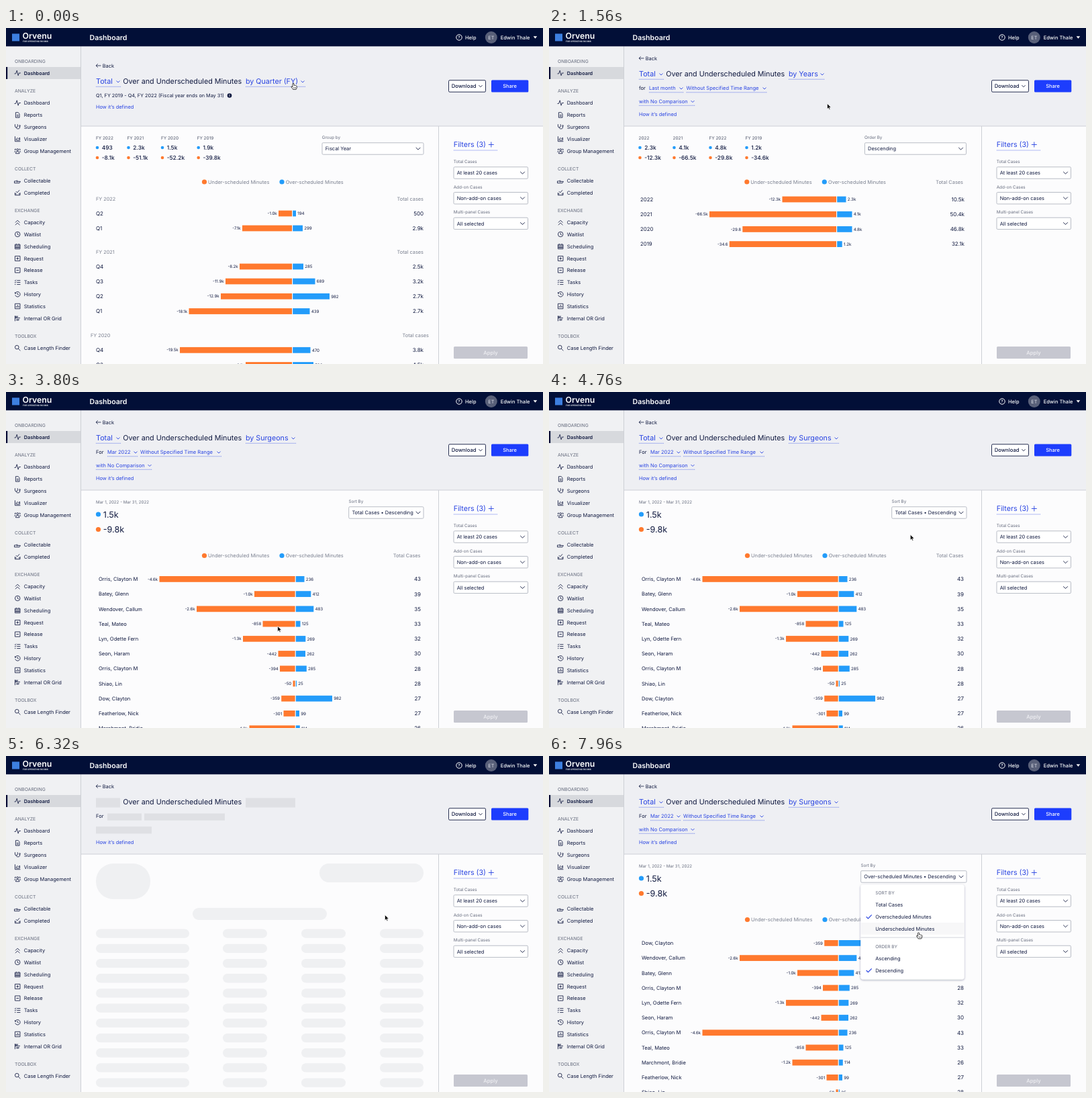
An HTML page that plays this animation: 800 by 500 pixels, repeating every 8 s.

```html
<!DOCTYPE html>
<html lang="en">
<head>
<meta charset="utf-8">
<title>Dashboard</title>
<style>
  html, body { margin: 0; width: 100%; height: 100%; overflow: hidden; background: #fcfcfd; }
  svg { display: block; width: 100%; height: 100%; }
  text { font-family: Inter, "Open Sans", sans-serif; text-rendering: geometricPrecision; white-space: pre; }
</style>
</head>
<body>
<svg viewBox="0 0 800 500">
  <defs>
    <filter id="shadow" x="-20%" y="-20%" width="140%" height="140%">
      <feDropShadow dx="0" dy="1" stdDeviation="1.8" flood-color="#101a3f" flood-opacity=".36"/>
    </filter>
  </defs>
  <g id="frame"></g>
  <g id="page"></g>
  <g id="cursor"></g>
</svg>
<script>
const INK = '#111a40', NAVY = '#020f37', LINK = '#2944e2', GREY = '#7b8090', LABEL = '#666c7e',
      ORANGE = '#ff792e', BLUE = '#239cfa', LINE = '#cdd0d6';
const $ = id => document.getElementById(id);

// Drawing helpers; text is centred vertically on y.
const text = (x, y, s, size = 7.5, fill = INK, weight = 400, anchor = 'start') =>
  `<text x="${x}" y="${y + size * 0.36}" font-size="${size}" fill="${fill}" font-weight="${weight}" text-anchor="${anchor}">${s}</text>`;
const rect = (x, y, w, h, fill, r = 0, extra = '') =>
  `<rect x="${x}" y="${y}" width="${w}" height="${h}" rx="${r}" fill="${fill}" ${extra}/>`;
const dot = (x, y, r, fill) => `<circle cx="${x}" cy="${y}" r="${r}" fill="${fill}"/>`;
const path = (d, stroke = INK, width = 0.8, extra = '') =>
  `<path d="${d}" fill="none" stroke="${stroke}" stroke-width="${width}" ${extra}/>`;
const chevron = (x, y, size = 3, stroke = INK) =>
  path(`M${x - size} ${y - size / 2}l${size} ${size}l${size} ${-size}`, stroke, 0.9);
const check = (x, y) => path(`M${x - 4} ${y}l2.7 2.7l5.3 -5.4`, LINK, 1.2);
const underline = (x, end, y) => path(`M${x} ${y}H${end}`, LINK, 0.8, 'stroke-dasharray="1.2 .8" opacity=".75"');
const link = (x, y, s, end, size = 7.55) =>
  text(x, y, s, size, LINK) + chevron(end - 4, y + 0.3, 2.5, LINK) + underline(x, end, y + (size > 9 ? 7.8 : 6.3));
const select = (x, y, end, s) =>
  rect(x, y - 8.7, end - x, 17.4, '#fff', 1.5, 'stroke="#a8acb8" stroke-width=".8"') +
  text(x + 4.7, y, s, 7.45) + chevron(end - 8, y, 3.3);

// Sidebar: [centre y, label, icon path on a 10 x 10 grid]; entries without an icon are headings.
const sidebar = [
  [49.5, 'ONBOARDING'],
  [67, 'Dashboard', 'M0 6H2.2L4 1L6 9L7.4 5H10'],
  [94, 'ANALYZE'],
  [111.5, 'Dashboard', 'M0 6H2.2L4 1L6 9L7.4 5H10'],
  [129.5, 'Reports', 'M2 1H6L8 3V9H2ZM3.5 5H6.5M3.5 7H6.5'],
  [147, 'Surgeons', 'M1 1V4A2 2 0 0 0 5 4V1M3 6V7A3 2 0 0 0 8.5 7V4.5M7.5 3.5A1 1 0 1 0 9.5 3.5A1 1 0 1 0 7.5 3.5'],
  [165, 'Visualizer', 'M1 1V9H9.5M3 7V5L5 3.5L6.5 5L8.5 3V7Z'],
  [183, 'Group Management', 'M3.5 3A1.5 1.5 0 1 0 6.5 3A1.5 1.5 0 1 0 3.5 3M2 9Q2 5.5 5 5.5T8 9ZM2.5 2H1V4M7.5 2H9V4M0 7L1.5 5M10 7L8.5 5'],
  [210, 'COLLECT'],
  [227, 'Collectable', 'M0 6H2L4 5L6 6.5H9.5L8 9H0ZM3 6.8H6'],
  [245, 'Completed', 'M1 5V9H9V5M1 7H3.5M6.5 7H9M2.5 3L4.5 5L8 1'],
  [272, 'EXCHANGE'],
  [289.5, 'Capacity', 'M1.5 5L5 1.5L8.5 5M1.5 9L5 5.5L8.5 9'],
  [307, 'Waitlist', 'M1 5A4 4 0 1 0 9 5A4 4 0 1 0 1 5M5 2.5V5.2L7 6.2'],
  [325, 'Scheduling', 'M1 2H9V9H1ZM1 4H9M3 .7V2M7 .7V2M3 5.5V8M5 5.5V8M7 5.5V8M1 6.5H9'],
  [343, 'Request', 'M1 1.2H9V8.8H1ZM3 5H7M5 3V7'],
  [360.5, 'Release', 'M1 1.2H9V8.8H1ZM3 5H7'],
  [378.5, 'Tasks', 'M.5 2L1.3 2.8L2.6 1M.5 5L1.3 5.8L2.6 4M.5 8.3H2M4 2H9.5M4 5H9.5M4 8.3H9.5'],
  [396, 'History', 'M1 2V4H3M1.3 4A4 4 0 1 1 1.3 6.5M5 3V5.3L6.8 6.2'],
  [414, 'Statistics', 'M1 1H9V9H1ZM3 7V5M5 7V3M7 7V4.5'],
  [432, 'Internal OR Grid', 'M1 1V9.5M1 2H6M1 4.5H9M3 7H8M1 3H5M3 8H7'],
  [459, 'TOOLBOX'],
  [476, 'Case Length Finder', 'M1 4A3 3 0 1 0 7 4A3 3 0 1 0 1 4M6.2 6.2L9.5 9.5']
];

function drawFrame() {
  let s = rect(0, 0, 800, 500, '#fcfcfd') + rect(111, 27, 689, 119, '#eeeff3') + rect(0, 27, 111.5, 473, '#f0f1f3') +
    rect(0, 58, 111, 18, '#d7d9dd') + rect(0, 58, 2.2, 18, NAVY) +
    path('M111.5 27V500M112 146H800M644.5 146V500', LINE, 1) + rect(0, 0, 800, 27.3, NAVY);
  for (const [y, label, icon] of sidebar) {
    if (!icon) { s += text(13, y, label, 6.8, LABEL); continue; }
    s += `<g transform="translate(12.5 ${y - 4.7}) scale(.94)">${path(icon, INK, 0.9)}</g>` +
      text(26.7, y, label, y === 67 ? 7.3 : 7.5, INK, y === 67 ? 600 : 400);
  }
  s += rect(9, 8.5, 11, 11, '#3d7fe0') + text(24.5, 11.5, 'Orvenu', 12.3, '#fff', 600) +
    text(25, 20, 'FOR OPERATING ROOMS', 3.15, '#fff', 600) + text(124.5, 14, 'Dashboard', 10.6, '#fff', 600) +
    `<circle cx="675" cy="14" r="4.2" fill="none" stroke="#fff"/>` + text(675, 14, '?', 6, '#fff', 600, 'middle') +
    text(684, 14, 'Help', 7.5, '#fff', 500) + dot(722.8, 14, 9, '#596079') +
    text(722.8, 14, 'ET', 7.2, '#dfe2ea', 400, 'middle') + text(736.7, 14, 'Edwin Thale', 7.5, '#fff', 500) +
    '<path d="M785.6 12.2h5.6l-2.8 3.6z" fill="#fff"/>';
  s += rect(659.5, 77.8, 55, 17.4, '#fff', 1.5, `stroke="${INK}" stroke-width=".9"`) +
    text(663.7, 86.5, 'Download', 7.7, INK, 500) + chevron(707, 86.5, 2.6) +
    rect(723, 77.5, 55.3, 18, '#1d3dfd', 1.5) + text(750.6, 86.5, 'Share', 7.5, '#fff', 500, 'middle');
  s += text(666.7, 173.5, 'Filters (3)', 10.7, LINK) + path('M718.8 173.5h8M722.8 169.5v8', LINK, 0.9) + underline(667, 732, 182);
  [['Total Cases', 'At least 20 cases'], ['Add-on Cases', 'Non-add-on cases'], ['Multi-panel Cases', 'All selected']]
    .forEach(([label, value], i) => {
      s += text(666.7, 198.5 + i * 37.8, label, 6.35, LABEL) + select(667, 215.5 + i * 37.7, 777.5, value);
    });
  return s + rect(667, 474, 110, 18, '#c6c7d0', 1.5) + text(722, 483, 'Apply', 7.7, '#f0f0f4', 500, 'middle');
}

const legend = (y, dx = 0) =>
  dot(295.5 + dx, y, 3.6, ORANGE) + text(301 + dx, y, 'Under-scheduled Minutes', 7.45, GREY) +
  dot(411 + dx, y, 3.6, BLUE) + text(416.7 + dx, y, 'Over-scheduled Minutes', 7.4, GREY);

// row: [name, under label, under start x, over end x, over label, total]
const barRow = (y, nameX, axis, totalX, [name, under, start, end, over, total], size = 7.6) =>
  text(nameX, y, name, size) + text(start - 2.3, y, under, 6.1, INK, 400, 'end') +
  rect(start, y - 4.4, axis - start, 8.8, ORANGE) + rect(axis + 1.2, y - 4.4, end - axis - 1.2, 8.8, BLUE) +
  text(end + 2.2, y, over, 6.2) + text(totalX, y, total, 8, INK, 400, 'end');

const summary = columns => columns.map(([x, title, over, under]) =>
  text(x, 163.5, title, 6.4, LABEL, 500) +
  dot(x + 2, 178, 2.3, BLUE) + text(x + 8.7, 178, over, 8.4, INK, 500) +
  dot(x + 2, 193, 2.3, ORANGE) + text(x + 8.7, 193, under, 8.4, INK, 500)).join('');

const heading = (y, by, end) =>
  text(143.7, y - 23.5, 'Back', 7.4) + path(`M141.5 ${y - 23.5}h-7.5m2.8 -2.6l-2.8 2.6l2.8 2.6`) +
  text(174.3, y, 'Over and Underscheduled Minutes', 10.75) +
  (by ? link(134, y, 'Total', 171, 10.8) + link(357, y, by, end, 10.7) : '');
const defined = y => text(134, y, 'How it’s defined', 7.45, LINK);

const quarters = [
  [276, 'Q2', '-1.0k', 406, 432, '194', '500'], [298, 'Q1', '-7.1k', 352, 442, '299', '2.9k'],
  [355, 'Q4', '-8.2k', 348, 443, '285', '2.5k'], [377, 'Q3', '-11.9k', 327, 460.5, '689', '3.2k'],
  [399.3, 'Q2', '-12.9k', 320, 482, '982', '2.7k'], [421.5, 'Q1', '-18.1k', 272.5, 452.5, '439', '2.7k'],
  [479.3, 'Q4', '-19.5k', 259, 453.5, '470', '3.8k'], [501.5, 'Q3', '-9.1k', 357, 458, '586', '4.5k']
];
const years = [
  ['2022', '-12.3k', 347.5, 442.5, '2.3k', '10.5k'], ['2021', '-66.5k', 239, 451.5, '4.1k', '50.4k'],
  ['2020', '-29.8', 288.3, 451.5, '4.8k', '46.8k'], ['2019', '-34.6', 268.8, 436.7, '1.2k', '32.1k']
];
const surgeons = [
  ['Orris, Clayton M', '-4.6k', 228.5, 444.5, '236', '43'], ['Batey, Glenn', '-1.0k', 370, 454.3, '412', '39'],
  ['Wendover, Callum', '-2.6k', 284, 458.3, '483', '35'], ['Teal, Mateo', '-858', 382.5, 438.5, '125', '33'],
  ['Lyn, Odette Fern', '-1.3k', 353, 446.3, '269', '32'], ['Seon, Haram', '-442', 405.5, 446, '262', '30'],
  ['Orris, Clayton M', '-394', 408, 447.8, '285', '28'], ['Shiao, Lin', '-50', 427.5, 433, '25', '28'],
  ['Dow, Clayton', '-359', 410.2, 486, '982', '27'], ['Featherlow, Nick', '-301', 413.5, 437, '99', '27'],
  ['Marchmont, Bridie', '-1.2k', 362.5, 437.8, '114', '26']
];
const byOver = [8, 2, 1, 6, 4, 5, 0, 3, 10, 9, 7];

const views = {
  quarters: () => heading(79.5, 'by Quarter (FY)', 446) +
    text(134, 100.5, 'Q1, FY 2019 - Q4, FY 2022 (Fiscal year ends on May 31)', 7.25) +
    dot(333, 100.5, 3.3, INK) + text(333, 100.5, 'i', 5, '#fff', 700, 'middle') + defined(117.5) +
    summary([[134, 'FY 2022', '493', '-8.1k'], [180.5, 'FY 2021', '2.3k', '-51.1k'],
      [231, 'FY 2020', '1.5k', '-52.2k'], [284.7, 'FY 2019', '1.9k', '-39.8k']]) +
    text(470.7, 162.5, 'Group by', 6.3, LABEL) + select(471, 179.5, 622, 'Fiscal Year') + legend(229) +
    [[254.5, 'FY 2022', 0], [333.5, 'FY 2021', 0], [457, 'FY 2020', 8]].map(([y, label, out]) =>
      text(134 - out, y, label, 7.3, GREY) + text(622 + out, y, 'Total cases', 7.35, GREY, 400, 'end')).join('') +
    quarters.map(([y, ...row]) => barRow(y, 134, 426, 622, row, 8)).join(''),

  years: () => heading(68.5, 'by Years', 411) + text(134, 89.5, 'for') +
    link(149, 89.5, 'Last month', 201) + link(204.6, 89.5, 'Without Specified Time Range', 325) +
    link(134, 109, 'with No Comparison', 218) + defined(128.5) +
    summary([[133.5, '2022', '2.3k', '-12.3k'], [184.5, '2021', '4.1k', '-66.5k'],
      [238.5, 'FY 2022', '4.8k', '-29.8k'], [292.5, 'FY 2019', '1.2k', '-34.6k']]) +
    text(470, 162.5, 'Order By', 6.3, LABEL) + select(470.4, 179.5, 621.5, 'Descending') + legend(229, -0.7) +
    text(617, 229, 'Total Cases', 7.4, GREY, 400, 'end') +
    years.map((row, i) => barRow(255 + i * 22.2, 136, 428, 619, row, 7.8)).join(''),

  skeleton: () => {
    let s = heading(68.5) + text(134, 89.5, 'For') + defined(128.5);
    for (const [x, y, w, h] of [[134, 62.5, 36, 14], [357, 62.5, 74, 14], [151, 85.5, 51, 10.3], [206, 85.5, 120, 10.3], [134, 105, 83, 10.5]])
      s += rect(x, y, w, h, '#dfe0e4');
    for (const [x, y, w, h] of [[134, 160, 81, 53], [467, 160, 155, 28], [278, 226, 200, 18]])
      s += rect(x, y, w, h, '#eff0f2', Math.min(h / 2, 26));
    for (let y = 257.5; y < 500; y += 22.2)
      for (const [x, w] of [[134, 139], [323, 66], [440, 66], [557, 65]]) s += rect(x, y, w, 13.3, '#eff0f2', 6.6);
    return s;
  },

  surgeons: over => heading(68.5, 'by Surgeons', 432) + text(134, 89.5, 'For') +
    link(151, 89.5, 'Mar 2022', 197) + link(200, 89.5, 'Without Specified Time Range', 321) +
    link(134, 109, 'with No Comparison', 218) + defined(128.5) +
    text(134, 163.5, 'Mar 1, 2022 - Mar 31, 2022', 6.2, LABEL) +
    dot(137.5, 182, 3.6, BLUE) + text(144.8, 182, '1.5k', 12.6) +
    dot(137.5, 204.5, 3.6, ORANGE) + text(144.8, 204.5, '-9.8k', 12.6) +
    text(over ? 464.5 : 510.5, 162.5, 'Sort By', 6.3, LABEL) +
    select(over ? 464.6 : 510.7, 179.5, 622, (over ? 'Over-scheduled Minutes' : 'Total Cases') + ' • Descending') +
    legend(243.5) + text(617.5, 243.5, 'Total Cases', 7.4, GREY, 400, 'end') +
    surgeons.map((row, i) => barRow(278.4 + i * 22.22, 138, 430.6, 618, over ? surgeons[byOver[i]] : row)).join('')
};

// Menus: groups of rows parted by rules; an upper-case row is a heading.
const groupMenu = ['by Fiscal Years', 'by Quarters (FY)', 'by Months (FY)', '-', 'by Years', 'by Quarters', 'by Months', 'by Day',
  'by Days of the Week', '-', 'by Region Groups', 'by Regions', 'by Locations', 'by Rooms', '-', 'by Service Lines', 'by Surgeons',
  '-', 'by Patient Classes', 'by Case Classes', 'by Robot Classes'];
const sortMenu = ['SORT BY', 'Total Cases', 'Overscheduled Minutes', 'Underscheduled Minutes', '-', 'ORDER BY', 'Ascending', 'Descending'];

function drawMenu({ items, x, y, w, checked }, hoverY) {
  let rowY = y + 12.3, body = '';
  for (const item of items) {
    if (item === '-') {
      body += path(`M${x} ${rowY - 4.5}h${w}`, LINE, 0.9);
      rowY += 8.9;
      continue;
    }
    const title = item === item.toUpperCase();
    if (!title && Math.abs(hoverY - rowY) < 6.2) body += rect(x, rowY - 8.9, w, 17.8, items === sortMenu ? '#f7f7f8' : '#e8e8ea');
    if (checked.includes(item)) body += check(x + 12.5, rowY);
    body += text(x + 22, rowY, item, title ? 6.6 : 7.45, title ? LABEL : INK);
    rowY += 17.75;
  }
  return rect(x, y, w, rowY - 4.3 - y, '#fff', 4, 'filter="url(#shadow)"') + body;
}

const groupBy = (y, item) => ({ items: groupMenu, x: 357, y, w: 104.3, checked: [item] });
const sortBy = (x, w, item) => ({ items: sortMenu, x, y: 191.3, w, checked: [item, 'Descending'] });
// [start ms, view, menu, sorted by over-scheduled minutes]
const scenes = [
  [0, 'quarters'], [160, 'quarters', groupBy(90.8, 'by Quarters (FY)')], [880, 'skeleton'],
  [1280, 'years'], [2150, 'years', groupBy(79.8, 'by Years')], [3430, 'skeleton'],
  [3700, 'surgeons'], [5300, 'surgeons', sortBy(510.3, 151, 'Total Cases')], [6000, 'skeleton'],
  [6560, 'surgeons', null, true], [7400, 'surgeons', sortBy(464.2, 154.5, 'Overscheduled Minutes'), true]
];

// [ms, x, y, hand pointer from here on]
const moves = [
  [0, 428, 82, 1], [300, 428, 82, 0], [740, 405, 165, 0], [1260, 405, 165, 0], [1480, 414.5, 112.5, 0], [1720, 414.5, 112.5, 0],
  [2060, 402, 70, 1], [2300, 402, 70, 0], [2860, 405, 332, 0], [3100, 405, 332, 0], [3280, 404.7, 348.5, 0], [4250, 404.7, 348.5, 0],
  [4960, 570, 180, 1], [5400, 570, 180, 0], [5660, 569.8, 227.8, 0], [5860, 564.5, 236.5, 0], [6720, 564.5, 236.5, 0],
  [7180, 566, 180, 1], [7500, 566, 180, 1], [7880, 550.5, 262.5, 1], [8000, 550.5, 262.5, 1]
];
const arrow = '<path d="M0 0V8L1.9 6.3L3.1 9L4.4 8.4L3.2 5.8H5.7Z" fill="#000" stroke="#fff" stroke-width=".6"/>';
const hand = '<path d="M-1 .8Q0 -.6 1 .8V3.4Q2 2.8 2.7 3.7Q3.6 3.1 4.2 4.1Q5.4 3.8 5.4 5.2Q5.4 7.6 4.2 9.4H-.4Q-1.4 7.6 -3 5.8Q-3.2 4.6 -2 4.9L-1 5.8Z" fill="#fff" stroke="#111" stroke-width=".8"/>' +
  path('M.7 6V8M2.1 6V8M3.5 6V8', '#111', 0.5);

function pointer(t) {
  const i = moves.findLastIndex(m => m[0] <= t), [t0, x0, y0, isHand] = moves[i], [t1, x1, y1] = moves[i + 1];
  const p = (t - t0) / (t1 - t0), ease = p * p * (3 - 2 * p);
  return { x: x0 + (x1 - x0) * ease, y: y0 + (y1 - y0) * ease, isHand };
}

let shown = '';
function tick() {
  const t = performance.now() % 8000, { x, y, isHand } = pointer(t);
  const [, view, menu, over] = scenes.findLast(s => s[0] <= t);
  const markup = views[view](over) + (menu ? drawMenu(menu, y) : '');
  if (markup !== shown) $('page').innerHTML = shown = markup;
  $('cursor').innerHTML = `<g transform="translate(${x} ${y})">${isHand ? hand : arrow}</g>`;
  requestAnimationFrame(tick);
}
$('frame').innerHTML = drawFrame();
tick();
</script>
</body>
</html>
```
